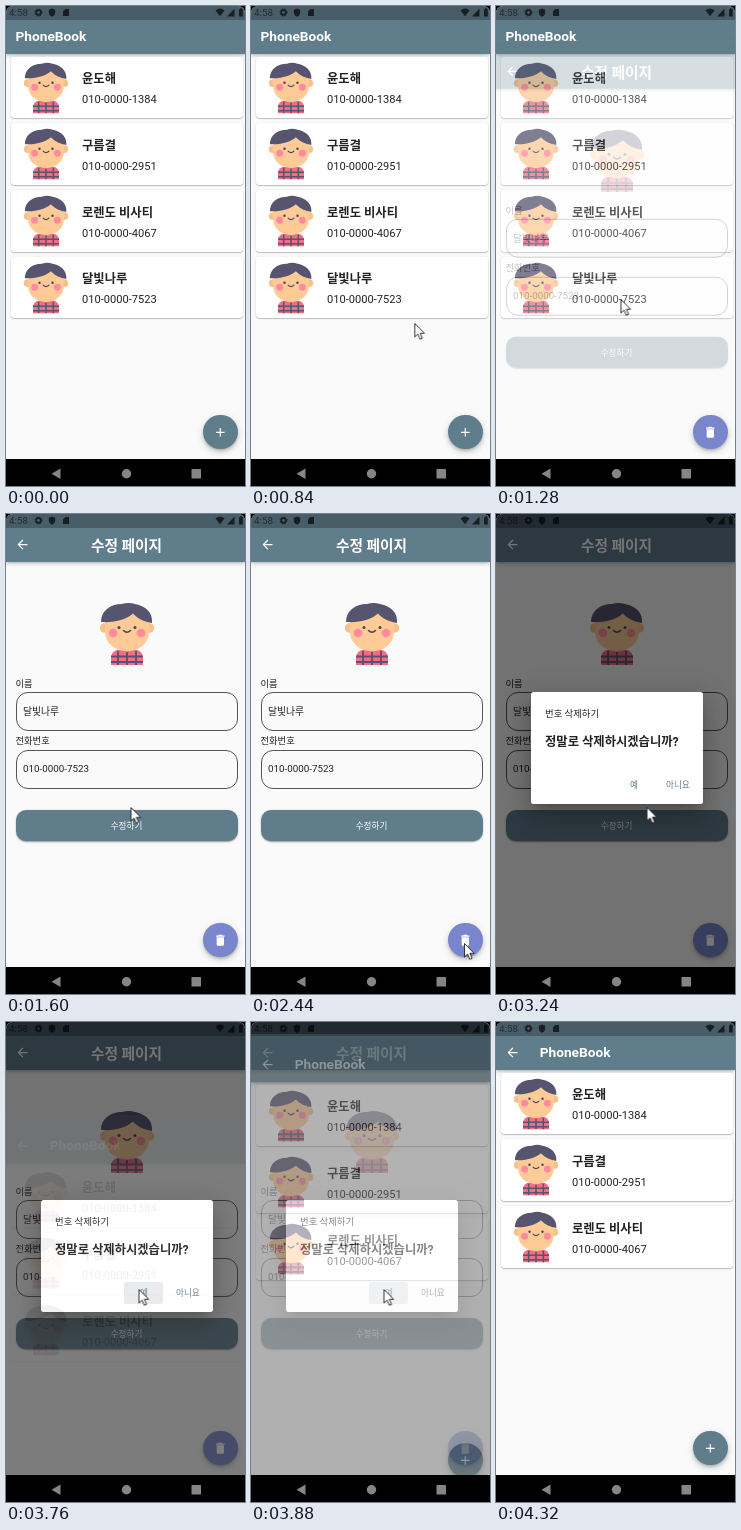
These frames come from a looping animation (239 by 480 pixels, 4.92 s). An HTML page:

```html
<!DOCTYPE html>
<html lang="ko">
<head>
<meta charset="utf-8">
<title>PhoneBook</title>
<style>
  :root { --loop: 4.92s; --slate: #607d8b; --move: cubic-bezier(.4, 0, .2, 1); }
  html, body { margin: 0; width: 100%; height: 100%; overflow: hidden; background: #000; }
  body { font-family: Roboto, "Noto Sans CJK KR", "Noto Sans CJK", sans-serif; color: #222; }
  #stage { position: relative; width: 239px; height: 480px; overflow: hidden; border-radius: 7px 7px 0 0; }
  #stage div, #stage svg { position: absolute; box-sizing: border-box; }

  .page { left: 0; top: 0; width: 239px; height: 454px; background: #fafafa; }
  .bar { left: 0; top: 0; width: 239px; height: 48px; background: var(--slate);
    box-shadow: 0 1px 2.4px -.6px #0003, 0 2.4px 3px #0002, 0 .6px 6px #0002; }
  /* text lines are 20px high and placed by their top edge */
  .text { line-height: 20px; height: 20px; white-space: nowrap; }
  .title { left: 9.5px; top: 20px; font-size: 13.7px; font-weight: 700; color: #fff; }
  .back { left: 9.4px; top: 23px; width: 15px; height: 15px; fill: #fff; }
  .back ~ .title { left: 43.7px; }

  .card { left: 5px; width: 231.5px; height: 61.5px; border-radius: 2.4px; background: #fff;
    box-shadow: 0 .7px 1px -.3px #0003, 0 .5px .8px #0002, 0 .5px 2px #0002; }
  .card svg { left: 9px; top: 5px; width: 52px; height: 52px; }
  .name { left: 71px; top: 12.5px; font-size: 12.3px; font-weight: 700; }
  .phone { left: 71px; top: 33.5px; font-size: 11.1px; }

  .fab { left: 197.3px; top: 409px; width: 34.4px; height: 34.4px; border-radius: 50%; background: var(--slate);
    box-shadow: 0 2px 3px -.6px #0003, 0 3.6px 6px #0002, 0 .6px 10px #0001; }
  .fab svg { left: 9.9px; top: 9.9px; width: 14.6px; height: 14.6px; fill: #fff; }
  #trash { background: #7986cb; animation: show-trash var(--loop) step-end infinite; }
  #before .fab { animation: hide-plus var(--loop) step-end infinite; }

  #edit .title { left: 0; top: 22px; width: 239px; text-align: center; text-indent: 2px; font-size: 14.7px; }
  #edit > svg.boy { left: 89px; top: 88px; width: 64px; height: 64px; }
  .label { left: 9.5px; font-size: 9.3px; }
  .field { left: 9.5px; width: 222.5px; height: 39px; border: 1px solid #555; border-radius: 12px; }
  .field .text { left: 6.5px; top: 8.5px; font-size: 9.8px; }
  .save { left: 9.5px; top: 296px; width: 222px; height: 31px; border-radius: 10px; background: var(--slate);
    color: #fff; font-size: 8.6px; line-height: 32px; text-align: center;
    box-shadow: 0 1.8px .8px -1.2px #0003, 0 1.2px 1.2px #0003, 0 .6px 3px #0002; }

  #scrim { left: 0; top: 0; width: 239px; height: 454px; background: rgba(0, 0, 0, .54);
    animation: open var(--loop) linear infinite; }
  #dialog { left: 35px; top: 178px; width: 172px; height: 112px; border-radius: 2.5px; background: #fff;
    box-shadow: 0 6px 9px -4px #0003, 0 14px 23px 2px #0002, 0 5px 28px 5px #0002;
    animation: open var(--loop) ease-out infinite; }
  .ask { left: 14px; top: 11.5px; font-size: 9.4px; }
  .sure { left: 14px; top: 39.5px; font-size: 12.3px; font-weight: 700; }
  .answer { top: 83px; font-size: 8.6px; color: var(--slate); }
  #press { left: 83px; top: 82px; width: 39px; height: 21.5px; border-radius: 2.5px;
    background: rgba(96, 110, 118, .14); animation: press var(--loop) linear infinite; }

  #edit { animation: slide-edit var(--loop) var(--move) infinite, fade-edit var(--loop) ease-in infinite; }
  #after { animation: slide-after var(--loop) var(--move) infinite, fade-after var(--loop) ease-in infinite; }
  #status { left: 0; top: 0; width: 239px; height: 13.5px; background: rgba(0, 0, 0, .25); }
  #status .text { left: 3px; top: -3.5px; font-size: 9.8px; color: #0008; }
  #status svg { left: 0; top: 0; }
  #nav { left: 0; top: 453px; width: 239px; height: 27px; background: #000; }
  #cursor { left: 0; top: 0; width: 13px; height: 19px; overflow: visible;
    animation: cursor var(--loop) ease-in-out infinite; }

  @keyframes slide-edit { 0%, 23.333% { translate: 0 113.5px; } 29.431%, 100% { translate: 0 0; } }
  @keyframes fade-edit { 0%, 23.333% { opacity: 0; } 29.431%, 100% { opacity: 1; } }
  @keyframes slide-after { 0%, 75.081% { translate: 0 113.5px; } 81.179%, 100% { translate: 0 0; } }
  @keyframes fade-after { 0%, 75.081% { opacity: 0; } 81.179%, 100% { opacity: 1; } }
  @keyframes show-trash { 0% { visibility: hidden; } 23.333%, 100% { visibility: visible; } }
  @keyframes hide-plus { 0% { visibility: visible; } 23.333%, 100% { visibility: hidden; } }
  @keyframes open { 0%, 51% { opacity: 0; } 54.05%, 100% { opacity: 1; } }
  @keyframes press { 0%, 73.9% { opacity: 0; } 75.6%, 100% { opacity: 1; } }
  @keyframes cursor {
    0%, .4% { translate: 250px 338px; }
    .81% { translate: 236px 336px; }
    6.5%, 16.26% { translate: 165px 318px; }
    21.95%, 33.33% { translate: 124.5px 293px; }
    47.97%, 52% { translate: 213px 429px; }
    53.66%, 56.1% { translate: 212px 426px; animation-timing-function: ease-in; }
    60.98% { translate: 200px 364px; animation-timing-function: ease-out; }
    69.92%, 87.5% { translate: 132.5px 267px; animation-timing-function: step-start; }
    87.6%, 100% { translate: 250px 338px; }
  }
</style>
</head>
<body>
<svg width="0" height="0" style="position:absolute">
  <symbol id="boy" viewBox="0 0 64 64">
    <path d="M26 43h12v9H26z" fill="#f3b683"/>
    <path d="M16 63v-7q0-8 9-8.500q7 4 14 0q9 .5 9 8.500v7z" fill="#f56c83"/>
    <path d="M23 49v14M32 50v13M41 49v14M16 54.500h32M16 60h32" fill="none" stroke="#57546f" stroke-width="1.900"/>
    <g fill="#fbbf8a"><circle cx="9.500" cy="26" r="4.700"/><circle cx="54.500" cy="26" r="4.700"/></g>
    <path d="M10 17v12c0 12 9 20 22 20s22-8 22-20V17L36 8z" fill="#fecb97"/>
    <path d="M6 20C6 9 15 2 27 2C31 .5 36 .5 40 2C51 4 58 11 57 21C50 20 43 17 38 11.500C32 17 20 21 6 20z" fill="#57546f"/>
    <g fill="#ff8a9e"><circle cx="18" cy="31" r="4.300"/><circle cx="46" cy="31" r="4.300"/></g>
    <g fill="#4b4560"><circle cx="24" cy="25.500" r="1.500"/><circle cx="40" cy="25.500" r="1.500"/></g>
    <path d="M28.500 28.500q3.500 3.500 7 0" fill="none" stroke="#4b4560" stroke-width="1.600" stroke-linecap="round"/>
  </symbol>
  <symbol id="plus" viewBox="0 0 24 24"><path d="M11 5h2v6h6v2h-6v6h-2v-6H5v-2h6z"/></symbol>
  <symbol id="bin" viewBox="0 0 24 24"><path d="M6 7h12v12q0 2-2 2H8q-2 0-2-2zM5 4h3.500l1-1h5l1 1H19v2H5z"/></symbol>
  <symbol id="arrow" viewBox="0 0 24 24"><path d="M20 11H7.800l5.600-5.600L12 4l-8 8 8 8 1.400-1.400L7.800 13H20z"/></symbol>
</svg>

<div id="stage">
  <div class="page" id="before">
    <div class="bar"><div class="text title">PhoneBook</div></div>
    <div class="fab"><svg><use href="#plus"/></svg></div>
  </div>

  <div class="page" id="edit">
    <div class="bar"><svg class="back"><use href="#arrow"/></svg><div class="text title">수정 페이지</div></div>
    <svg class="boy"><use href="#boy"/></svg>
    <div class="text label" style="top:159.500px">이름</div>
    <div class="field" style="top:178px"><div class="text" id="editName"></div></div>
    <div class="text label" style="top:217px">전화번호</div>
    <div class="field" style="top:235.500px"><div class="text" id="editPhone"></div></div>
    <div class="save">수정하기</div>
  </div>
  <div class="fab" id="trash"><svg><use href="#bin"/></svg></div>

  <div id="scrim"></div>
  <div id="dialog">
    <div class="text ask">번호 삭제하기</div>
    <div class="text sure">정말로 삭제하시겠습니까?</div>
    <div id="press"></div>
    <div class="text answer" style="left:99px">예</div>
    <div class="text answer" style="left:135px">아니요</div>
  </div>

  <div class="page" id="after">
    <div class="bar"><svg class="back"><use href="#arrow"/></svg><div class="text title">PhoneBook</div></div>
    <div class="fab"><svg><use href="#plus"/></svg></div>
  </div>

  <div id="status">
    <div class="text">4:58</div>
    <svg width="239" height="14" fill="#000a">
      <circle cx="32.500" cy="6.500" r="2.300" fill="none" stroke="#000a" stroke-width="1.700"/>
      <circle cx="32.500" cy="6.500" r="3.500" fill="none" stroke="#000a" stroke-dasharray="1.400"/>
      <path d="M46 2.500l3.200 1.300v2.700q0 2.800-3.200 4.200q-3.200-1.400-3.200-4.200v-2.700z"/>
      <path d="M59.500 3h3.500v7h-6V5.300z"/>
      <path d="M209.500 4.500q4.500-3.800 9 0l-4.500 5.700z"/>
      <path d="M228.500 2.500v8h-7.500z"/>
      <path d="M233 3.300h1v-1h1.800v1h1v7.200h-3.800z"/>
    </svg>
  </div>

  <div id="nav">
    <svg width="239" height="27" fill="#858585">
      <path d="M54.500 9.500v10.500l-9-5.250z"/>
      <circle cx="120.500" cy="14.800" r="4.700"/>
      <rect x="185.500" y="10" width="9.500" height="9.500" rx=".5"/>
    </svg>
  </div>

  <svg id="cursor"><path d="M.5 .5v13.500l3.100-2.900 2.200 5.200 2.300-1-2.200-5h4.200z" fill="#fff" stroke="#222" stroke-width=".9"/></svg>
</div>

<script>
  const people = [
    ["윤도해", "010-0000-1384"],
    ["구름결", "010-0000-2951"],
    ["로렌도 비사티", "010-0000-4067"],
    ["달빛나루", "010-0000-7523"],
  ];

  const card = ([name, phone], i) => `
    <div class="card" style="top:${50.8 + i * 66.6}px">
      <svg><use href="#boy"/></svg>
      <div class="text name">${name}</div>
      <div class="text phone">${phone}</div>
    </div>`;

  const fill = (id, list) =>
    document.getElementById(id).insertAdjacentHTML("beforeend", list.map(card).join(""));

  fill("before", people);
  fill("after", people.slice(0, 3));
  [editName.textContent, editPhone.textContent] = people[3];
</script>
</body>
</html>
```
